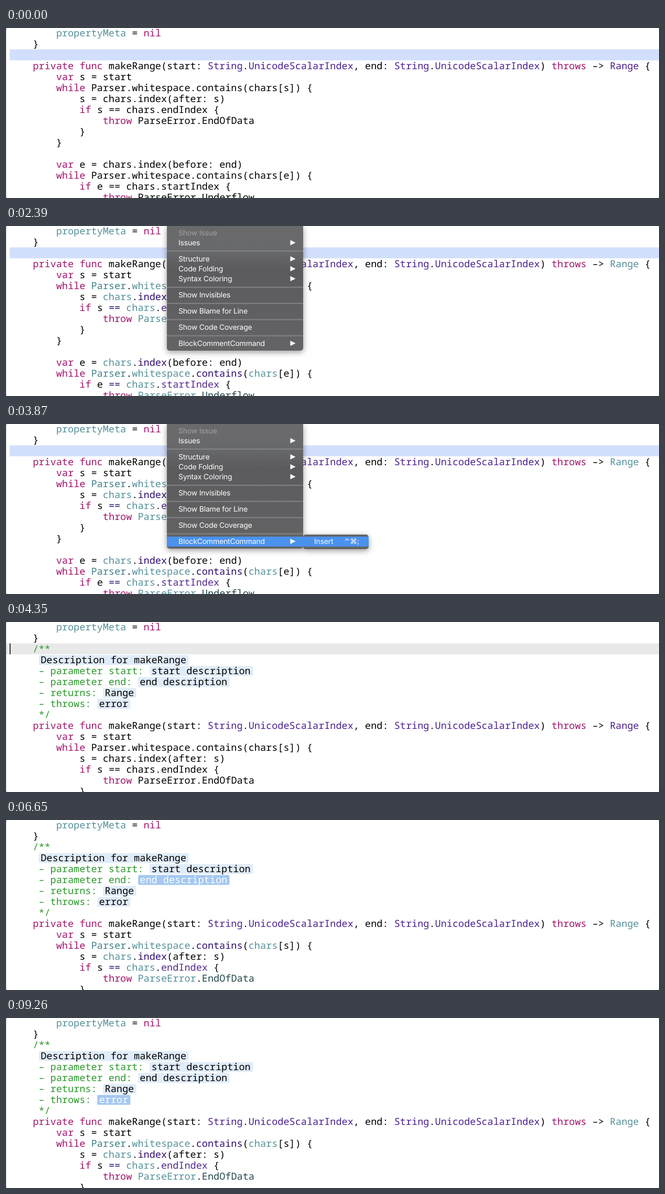
Animation of 1246x326 px, one loop 9300 ms. Source, as an HTML page:

```html
<!DOCTYPE html>
<html lang="en">
<head>
<meta charset="utf-8">
<title>Inserting a documentation comment</title>
<style>
  html, body { margin: 0; width: 100%; height: 100%; overflow: hidden; background: #fff; }
  svg { display: block; width: 1246px; height: 326px; }
  .code text { font: 500 18.55px "Noto Sans Mono", "DejaVu Sans Mono", monospace; }
  text { white-space: pre; text-rendering: geometricPrecision; }
  .keyword { fill: #a0156a; }
  .type, .result { fill: #4b2190; }
  .field, .indexed .result, .indexed .project { fill: #55919a; }
  .indexed .parser { fill: #3f7f8a; }
  .indexed .method { fill: #2e0d6e; }
  .indexed .property { fill: #55298f; }
  .indexed .case { fill: #26474b; }
  .comment { fill: #2b982b; }
  .slot rect { fill: #e0ecf9; }
  .slot.selected rect { fill: #a4c8f0; }
  .slot.selected text { fill: #fff; }
  .menu { filter: drop-shadow(0 3px 6px #0006); }
  .menu text { font: 14px Inter, Roboto, sans-serif; letter-spacing: -.2px; fill: #fff; }
  .menu .disabled { fill: #a0a0a1; }
  .menu .keys { font: 14px "DejaVu Sans", sans-serif; letter-spacing: -.5px; }
  .active { fill: #4a92ee; }
</style>
</head>
<body>
<svg viewBox="0 0 1246 326">
  <defs>
    <linearGradient id="glass" x2="0" y2="1">
      <stop stop-color="#6a6a6c"/>
      <stop offset=".2" stop-color="#68696c"/>
      <stop offset=".35" stop-color="#5b5b5d"/>
      <stop offset="1" stop-color="#646466"/>
    </linearGradient>
  </defs>
  <rect width="1246" height="326" fill="#777"/>
  <rect width="1246" height="326" rx="2.5" fill="#d6d6d6"/>
  <rect x="1" width="1245" height="326" rx="2.5" fill="#fff"/>
  <rect id="selectedRow" x="7" y="41" width="1239" height="21" fill="#d2dffc"/>
  <g id="caretRow">
    <rect x="1" y="41" width="1245" height="21" fill="#e9e9e9"/>
    <rect x="7" y="41" width="1.5" height="21"/>
  </g>
  <g class="code" id="code">
    <g id="head"></g>
    <g id="comment"></g>
    <g id="body"></g>
  </g>
  <g class="menu" id="menu">
    <path d="M307 0H567V234a5 5 0 0 1-5 5H312a5 5 0 0 1-5-5Z" fill="url(#glass)"/>
    <path d="M307 48h260M307 117.5h260M307 148.5h260M307 179.5h260M307 210.5h260" stroke="#838385" stroke-width="2"/>
    <rect id="activeItem" class="active" x="307" y="216" width="260" height="19"/>
    <g id="items"></g>
    <g id="submenu">
      <rect x="567" y="212" width="125" height="28" rx="5" fill="#656567"/>
      <rect id="activeInsert" class="active" x="567" y="216" width="125" height="19"/>
      <text x="588" y="230">Insert</text>
      <text class="keys" x="645" y="230">^⌘;</text>
    </g>
  </g>
</svg>
<script>
const LOOP = 9300, CHAR = 11.13, LEFT = 6.7, LINE = 21;
const INDEXED = 500, MENU_OPEN = 1500, HOVER = 2500, SUBMENU = 2700,
      HOVER_INSERT = 3740, MENU_CLOSE = 3900, INSERTED = 4250, REINDEXED = 5200;
const TABS = [5050, 6050, 6500, 6950, 7400];

const $ = id => document.getElementById(id);
const words = {
  keyword: 'private func throws var while if throw nil',
  type: 'String UnicodeScalarIndex',
  result: 'Range',
  field: 'propertyMeta',
  project: 'chars whitespace ParseError',
  parser: 'Parser',
  method: 'contains index ==',
  property: 'endIndex startIndex',
  case: 'EndOfData Underflow'
};
const classOf = {};
for (const [name, list] of Object.entries(words))
  for (const word of list.split(' ')) classOf[word] = name;

function add(parent, tag, attrs, content = '') {
  const el = document.createElementNS('http://www.w3.org/2000/svg', tag);
  for (const key in attrs) el.setAttribute(key, attrs[key]);
  el.textContent = content;
  return parent.appendChild(el);
}
const column = n => LEFT + n * CHAR;
const baseline = row => 16 + row * LINE;

function codeLine(parent, row, line) {
  const source = line.trimStart();
  const text = add(parent, 'text', { x: column(line.length - source.length), y: baseline(row) });
  for (const token of source.match(/\w+|==|[^\w=]+|=/g) || [])
    add(text, 'tspan', { class: classOf[token] || 'plain' }, token);
}

['        propertyMeta = nil', '    }'].forEach((line, i) => codeLine($('head'), i, line));

`    private func makeRange(start: String.UnicodeScalarIndex, end: String.UnicodeScalarIndex) throws –> Range {
        var s = start
        while Parser.whitespace.contains(chars[s]) {
            s = chars.index(after: s)
            if s == chars.endIndex {
                throw ParseError.EndOfData
            }
        }

        var e = chars.index(before: end)
        while Parser.whitespace.contains(chars[e]) {
            if e == chars.startIndex {
                throw ParseError.Underflow`
  .split('\n').forEach((line, i) => codeLine($('body'), i + 3, line));

// Each comment line: column, green text, optional placeholder.
const slots = [];
[
  [4, '/**'],
  [5, '', 'Description for makeRange'],
  [5, '– parameter start: ', 'start description'],
  [5, '– parameter end: ', 'end description'],
  [5, '– returns: ', 'Range'],
  [5, '– throws: ', 'error'],
  [5, '*/']
].forEach(([col, label, slot], i) => {
  const y = baseline(i + 2);
  add($('comment'), 'text', { x: column(col), y, class: 'comment' }, label);
  if (!slot) return;
  const x = column(col + label.length), g = add($('comment'), 'g', { class: 'slot' });
  add(g, 'rect', { x: x + .5, y: y - 15.5, width: slot.length * CHAR + 7.5, height: 19, rx: 2 });
  add(g, 'text', { x: x + 3.8, y }, slot);
  slots.push(g);
});

[
  ['Show Issue', 13], ['Issues', 32, true], ['Structure', 63, true],
  ['Code Folding', 82, true], ['Syntax Coloring', 101, true],
  ['Show Invisibles', 132], ['Show Blame for Line', 163],
  ['Show Code Coverage', 194], ['BlockCommentCommand', 225, true]
].forEach(([label, y, nested], i) => {
  add($('items'), 'text', { x: 329, y: y + 5, class: i ? 'item' : 'disabled' }, label);
  if (nested) add($('items'), 'path', { d: `M542.5 ${y - 5}l10 5l-10 5Z`, fill: '#fff' });
});

const show = (id, on) => $(id).style.display = on ? '' : 'none';

function render(t) {
  const inserted = t >= INSERTED;
  const tab = TABS.filter(time => t >= time).length - 1;
  const indexed = inserted ? t >= REINDEXED : t >= INDEXED;
  show('selectedRow', !inserted);
  show('caretRow', inserted && tab < 0);
  show('comment', inserted);
  $('code').classList.toggle('indexed', indexed);
  $('body').setAttribute('transform', `translate(0 ${inserted ? 6 * LINE : 0})`);
  slots.forEach((slot, i) => slot.classList.toggle('selected', i === tab));

  const fade = Math.min(1, Math.max(0, 1 - (t - MENU_CLOSE) / 150));
  show('menu', t >= MENU_OPEN && fade > 0);
  $('menu').style.opacity = fade;
  show('activeItem', t >= HOVER);
  show('submenu', t >= SUBMENU);
  show('activeInsert', t >= HOVER_INSERT);
}

function tick() {
  render(performance.now() % LOOP);
  requestAnimationFrame(tick);
}
tick();
</script>
</body>
</html>
```
